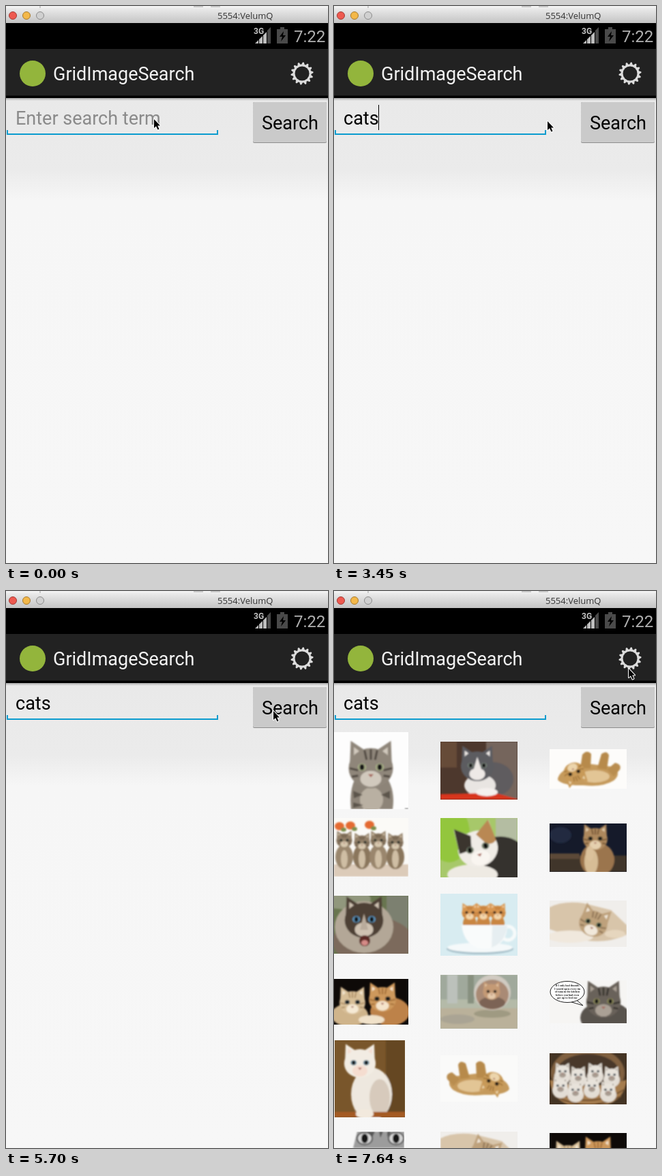
Write an HTML page that moves like this. It is 472x817 px and loops after 8 s.

```html
<!DOCTYPE html>
<html lang="en">
<head>
<meta charset="utf-8">
<title>Image search</title>
<style>
html, body { margin: 0; width: 100%; height: 100%; overflow: hidden; background: #f7f7f7; }
body > svg { display: block; width: 100%; height: 100%; }
text { font-family: Roboto, sans-serif; font-size: 27px; }
</style>
</head>
<body>
<svg viewBox="0 0 472 817">
  <defs>
    <linearGradient id="page" x2="0" y2="1">
      <stop offset="0" stop-color="#e9e9e9"/><stop offset=".155" stop-color="#ebebeb"/>
      <stop offset=".222" stop-color="#f6f6f6"/><stop offset="1" stop-color="#f7f7f7"/>
    </linearGradient>
    <linearGradient id="chrome" x2="0" y2="1">
      <stop offset="0" stop-color="#ebebeb"/><stop offset="1" stop-color="#c4c4c4"/>
    </linearGradient>
    <linearGradient id="shade" x2="0" y2="1">
      <stop offset="0" stop-color="#aaa"/><stop offset="1" stop-color="#e9e9e9"/>
    </linearGradient>
    <filter id="soft"><feGaussianBlur stdDeviation=".8"/></filter>
  </defs>

  <rect y="135" width="472" height="682" fill="url(#page)"/>
  <rect y="135" width="472" height="4" fill="url(#shade)"/>

  <!-- window title -->
  <rect width="472" height="3" fill="#f1f1f1"/>
  <path d="M275 0h14v2h-14zM300 0h14v2h-14zM49 0h2v3h-2z" fill="#c8c8c8"/>
  <rect y="3" width="472" height="22" fill="url(#chrome)"/>
  <g stroke-width="1">
    <circle cx="10" cy="14" r="5.5" fill="#ee5a50" stroke="#a33a35"/>
    <circle cx="30" cy="14" r="5.5" fill="#f3b84a" stroke="#a87a2c"/>
    <circle cx="50" cy="14" r="5.5" fill="#d0d0d0" stroke="#8c8c8c"/>
  </g>
  <text x="310" y="19" fill="#333" style="font:13px 'Open Sans',sans-serif">5554:VelumQ</text>

  <!-- status bar -->
  <rect y="25" width="472" height="38"/>
  <text x="363" y="41" fill="#c4c4c4" style="font-size:12px;font-weight:700">3G</text>
  <path d="M365 55L383 37V55z" fill="#bdbdbd"/>
  <path d="M383 36L388 31V55H383z" fill="#4a4a4a"/>
  <path d="M370.500 49V55M376.500 43V55M382.500 37V55" stroke="#000"/>
  <path d="M402 31h6v3h5v21h-16V34h5z" fill="#4a4a4a"/>
  <path d="M407 37l-6 8h4l-2 7 7-9h-4z"/>
  <text x="422" y="53" fill="#b0b0b0" style="font-size:24px">7:22</text>

  <!-- action bar -->
  <rect y="63" width="472" height="69" fill="#222"/>
  <rect y="131.500" width="472" height="3.500"/>
  <circle cx="39" cy="99" r="19" fill="#93b53c"/>
  <text x="69" y="109" fill="#f3f3f3">GridImageSearch</text>
  <path id="gear" fill="#dcdcdc"/>
  <circle cx="434" cy="99" r="10.500" fill="#222"/>

  <!-- search form -->
  <path d="M2 182V188H310V182" fill="none" stroke="#0a9bce" stroke-width="2"/>
  <text id="field" x="14" y="174"></text>
  <rect id="caret" y="145" width="1" height="37"/>
  <rect x="362" y="141" width="108" height="60" rx="2" fill="#8e8e8e"/>
  <rect id="button" x="362" y="141" width="108" height="59" rx="2"/>
  <text x="375" y="181">Search</text>

  <g id="results"></g>
  <path id="pointer" d="M0 0V13L3 10.200L5.500 15.500L7.500 14.500L5.200 9.500H9z" stroke="#fff" stroke-width="2" paint-order="stroke" stroke-linejoin="round"/>
</svg>
<script>
const $ = id => document.getElementById(id);

$('gear').setAttribute('d', 'M' + Array.from({ length: 56 }, (_, i) => {
  const r = i % 4 < 2 ? 16.5 : 13.5, a = (i + .5) * Math.PI / 28;
  return [434 + r * Math.sin(a), 99 - r * Math.cos(a)].map(n => n.toFixed(1));
}).join('L') + 'z');

// ---- simplified photos ----
const box = (x, y, w, h, c) => `<rect x="${x}" y="${y}" width="${w}" height="${h}" fill="${c}"/>`;
const oval = (x, y, rx, ry, c) => `<ellipse cx="${x}" cy="${y}" rx="${rx}" ry="${ry}" fill="${c}"/>`;
const poly = (d, c) => `<path d="${d}" fill="${c}"/>`;
const move = (t, s) => `<g transform="${t}">${s}</g>`;
const row = (xs, f) => xs.map(f).join('');
const frameOf = (x, y, w, h, s) => `<svg x="${x}" y="${y}" width="${w}" height="${h}">${s}</svg>`;
const tile = (x, y, w, h, bg, ...parts) =>
  frameOf(x, y, w, h, box(0, 0, w, h, bg) + `<g filter="url(#soft)">${parts.join('')}</g>`);

// cat head of radius r: fur, muzzle, eye and stripe colours
const head = (x, y, r, fur, light, eye = '#222', mark = '') => move(`translate(${x} ${y}) scale(${r / 10})`,
  poly('M-10 0L-9.500 -13L-2 -8H2L9.500 -13L10 0z', fur) +
  poly('M-8 -5L-8 -10L-4 -7zM8 -5L8 -10L4 -7z', light) +
  oval(0, 0, 10.5, 9.5, fur) +
  (mark && `<path d="M0 -9V-4M-3 -8.500L-2 -4M3 -8.500L2 -4M-10 0L-6 1M10 0L6 1M-9 4L-6 3.500M9 4L6 3.500" stroke="${mark}"/>`) +
  oval(0, 5, 5, 3.8, light) +
  oval(-4.2, -.5, 2, 1.8, eye) + oval(4.2, -.5, 2, 1.8, eye) +
  oval(-4.2, -.5, 1.1, 1.4, '#151515') + oval(4.2, -.5, 1.1, 1.4, '#151515') +
  poly('M-1.300 2.800H1.300L0 4.300z', '#a5655a'));

const rolling = poly('M20 32Q38 20 62 22L94 26Q106 36 94 46Q78 56 50 53Q20 54 12 45Q12 38 20 32z', '#c59a5c') +
  poly('M45 28L48 8Q55 0 61 7L60 28zM70 28L76 7Q84 1 87 9L84 30z', '#b78a4b') +
  poly('M84 30L96 20Q106 22 103 30L94 40z', '#b98d50') +
  oval(66, 40, 22, 9, '#e2c595') +
  move('rotate(160 36 34)', head(36, 34, 15, '#c89a58', '#ecd5ac', '#4c3a22', '#9a7039'));

const lounging = poly('M0 10Q20 0 50 4L90 14L113 36V50Q80 66 40 56L0 42z', '#d8c5aa') +
  oval(30, 53, 34, 9, '#f0e8dd') +
  move('rotate(20 64 34)', head(64, 34, 20, '#bea17c', '#f1e8da', '#65765b', '#8c7253')) +
  oval(96, 49, 15, 6, '#e6d6be');

const pair = oval(23, 53, 27, 17, '#cfb48b') + oval(82, 48, 29, 21, '#bd8248') +
  head(27, 35, 18, '#d8bf98', '#f5e9d4', '#30404a', '#aa8a60') +
  head(71, 30, 19, '#cd985c', '#f5e4cb', '#33302a', '#a06c36') +
  oval(55, 60, 19, 7, '#f0e1c9');

const bubble =
  `<path d="M37 27L49 37L29 31" fill="#fff" stroke="#222"/>
  <ellipse cx="26" cy="17" rx="25" ry="15.500" fill="#fff" stroke="#222"/>
  <g fill="#222" text-anchor="middle">` +
  row(['If I only had thumbs', 'I would open every tin', 'of tuna in the kitchen', 'before you had even', 'got up to feed me'],
    (s, i) => `<text x="26" y="${9 + i * 4.6}" style="font:700 4px 'Liberation Serif',serif">${s}</text>`) + '</g>';

$('results').innerHTML = [
  tile(0, 207, 109, 113, '#fdfdfd',
    poly('M25 113Q22 85 32 66H77Q90 85 86 113z', '#8d8478'),
    oval(55, 99, 17, 18, '#b9b0a2'),
    poly('M28 86L42 92L29 97zM82 86L69 92L82 98zM28 103L43 107L28 111z', '#5b544b'),
    head(54, 53, 31, '#8f867a', '#d1c9bd', '#a7ae86', '#514a42'), box(104, 112, 5, 1, '#333')),

  tile(156, 221, 113, 85, '#4d382d',
    box(67, 0, 46, 85, '#75655c'), box(0, 0, 24, 38, '#664b38'),
    oval(77, 55, 30, 25, '#5e5b5e'), oval(58, 64, 23, 16, '#e9e5e2'),
    poly('M0 77L79 75L113 84V85H0z', '#d8361c'), head(54, 36, 23, '#5c5c61', '#eee9e6', '#778178'),
    poly('M54 22L47 47H62z', '#eee9e6'), oval(68, 74, 16, 6, '#f4f0ed')),

  tile(316, 232, 113, 58, '#fdfcfa', rolling),

  tile(0, 333, 109, 86, '#fbfaf7',
    box(0, 68, 109, 18, '#dccbb9'),
    row([15, 41, 65, 90], (x, i) => oval(x, 57, 13, 18, i % 2 ? '#8a765c' : '#9a866d') + oval(x, 60, 5, 13, '#cfbea4') +
      head(x, 33 + i % 2 * 3, 11, '#927f68', '#d7c8af', '#3f493d', '#594a38')),
    row([8, 24, 52], (x, i) => oval(x, 12 - i, 7, 6, '#e46a30') + oval(x + 6, 17 - i, 4, 3, '#7b8e4b'))),

  tile(156, 333, 113, 87, '#a7c86a',
    oval(13, 23, 30, 42, '#93c63e'), box(81, 0, 32, 40, '#b4bda2'),
    oval(88, 64, 41, 37, '#34302d'), oval(47, 83, 37, 15, '#eeeae3'),
    move('rotate(-16 55 45)', head(55, 45, 28, '#f0ece6', '#f9f5f0', '#788271') +
      poly('M27 45L29 8L50 24L46 42Q36 46 27 45z', '#3a342f') + poly('M58 24L81 8L84 40Q76 46 68 40z', '#b98853') +
      row([43, 67], x => oval(x, 44, 5, 5, '#75816d') + oval(x, 44, 3, 4, '#111')))),

  tile(316, 341, 113, 71, '#151a2a',
    box(0, 47, 113, 24, '#40342a'), box(0, 44, 44, 8, '#5b4938'), oval(16, 17, 16, 12, '#202940'),
    oval(70, 53, 25, 25, '#9b754d'), oval(61, 56, 10, 19, '#d7bd96'),
    head(67, 23, 17, '#ad885d', '#e5d0af', '#3d3a2c', '#6d4d2e'), oval(59, 44, 6, 11, '#dbc19b')),

  tile(0, 447, 109, 85, '#68754f',
    box(77, 0, 32, 85, '#7b8070'), oval(16, 5, 38, 15, '#91977d'),
    oval(57, 67, 59, 36, '#7c6b5c'), oval(44, 46, 43, 38, '#b3a797'),
    head(44, 36, 27, '#4d4036', '#cfc2b2', '#5c9bc7'), poly('M44 26L38 50H50z', '#b9ab9c'),
    oval(45, 66, 8, 8, '#5c2926'), oval(45, 69, 5, 4, '#d58b87')),

  tile(156, 444, 113, 91, '#d8ecf1',
    oval(58, 81, 49, 8, '#a8c1cb'), oval(58, 79, 48, 7, '#f5f9fa'),
    `<circle cx="99" cy="58" r="10" fill="none" stroke="#f7fafa" stroke-width="5"/>`,
    row([43, 63, 84], x => oval(x, 45, 10, 14, '#c98643') + head(x, 28, 11, '#d99650', '#f3d7ac', '#443022', '#b26d2e')),
    poly('M31 46H98Q98 78 65 81Q35 79 31 46z', '#f9fbfb'), poly('M76 47H98Q95 72 75 79z', '#e6eef1')),

  tile(316, 454, 113, 68, '#f0eeeb', lounging),
  tile(0, 569, 109, 67, '#0e0a08', pair),

  tile(156, 563, 113, 79, '#b4baa8',
    box(0, 0, 113, 36, '#a0a99c'), box(10, 0, 15, 42, '#bcc1bb'), box(40, 0, 9, 42, '#87907f'),
    box(0, 49, 113, 30, '#bab19a'), oval(25, 65, 25, 7, '#aaa494'), oval(76, 57, 27, 6, '#9f9a82'),
    oval(76, 26, 27, 26, '#d0cac1'), oval(76, 29, 24, 22, '#a98a75'), oval(76, 41, 19, 9, '#7c6454'),
    head(75, 25, 12, '#c49a75', '#e4c9aa', '#4c4033')),

  tile(316, 571, 113, 63, '#f6f5f3',
    oval(82, 55, 37, 24, '#59534e'), head(79, 32, 24, '#69625a', '#aaa095', '#8d8b59', '#302d29')),
  frameOf(316, 571, 113, 63, bubble),

  tile(1, 659, 103, 113, '#79562b',
    box(75, 0, 28, 113, '#654622'), oval(54, 79, 30, 39, '#eee8df'), oval(66, 84, 15, 27, '#d7cabc'),
    head(37, 34, 22, '#f2ece3', '#f5ddd0', '#658da0'), box(0, 105, 103, 8, '#a45a20'), oval(44, 108, 13, 7, '#f2e9dd')),

  tile(156, 681, 113, 68, '#fafaf9', move('translate(113 5) scale(-1 1)', rolling)),

  tile(316, 678, 113, 75, '#443424',
    oval(56, 29, 54, 38, '#806040'), oval(56, 30, 47, 29, '#49392b'),
    poly('M0 39Q56 57 113 39Q109 69 84 75H27Q3 67 0 39z', '#a57c4d'),
    `<path d="M3 53Q56 85 110 53M8 63Q56 88 105 63" fill="none" stroke="#6e4d2d" stroke-width="2"/>`,
    row([19, 42, 67, 91, 16, 38, 62, 86], (x, i) => {
      const y = i < 4 ? 27 + i % 2 * 5 : 48 + i % 2 * 6;
      return oval(x, y + 7, 12, 11, '#e3ddd4') + head(x, y, 10, '#e8e3db', '#a79c91', '#596b79');
    })),

  tile(0, 793, 103, 24, '#f7f7f7',
    poly('M28 24L34 0H103V24z', '#9c9c9c'), poly('M49 0L55 10L60 0M66 0L68 9L72 0M78 0L78 8L84 0', '#555'),
    row([45, 91], x => oval(x, 10, 12, 10, '#4b4b4b') + oval(x, 10, 10, 8, '#d7d7d7') + oval(x, 10, 5, 7, '#151515'))),
  tile(156, 793, 113, 24, '#f0eeeb', lounging),
  tile(316, 795, 113, 22, '#0e0a08', pair)
].join('');

// ---- timeline ----
const LOOP = 8000;
const blinks = [150, 1200, 1500, 2700, 3150, 3600, 4050, 4650, 5100, 5700, 6150, 6600, 7190, 7640];
const typed = [[0, '', 14], [1500, 'c', 27], [1800, 'ca', 42], [2100, 'cat', 51], [3150, 'cats', 65]];
const trail = [
  [0, 217, 166], [3450, 313, 169], [3600, 351, 170], [3750, 375, 172], [3900, 392, 176],
  [6750, 396, 158], [6900, 404, 111], [7040, 408, 101], [7190, 423, 107], [7340, 432, 114]
];
const at = (steps, t) => steps.findLast(s => s[0] <= t);
const show = (id, on) => $(id).setAttribute('visibility', on ? 'visible' : 'hidden');

function draw(t) {
  const [, word, caretX] = at(typed, t), [, x, y] = at(trail, t);
  $('field').textContent = word || 'Enter search term';
  $('field').setAttribute('fill', word ? '#000' : '#8a8a8a');
  $('caret').setAttribute('x', caretX);
  show('caret', blinks.filter(b => b <= t).length % 2);
  $('button').setAttribute('fill', t >= 5100 && t < 5400 ? '#97d1e8' : '#cacaca');
  show('results', t >= 6150);
  $('pointer').setAttribute('transform', `translate(${x} ${y})`);
}

const start = performance.now();
function frame() {
  draw((performance.now() - start) % LOOP);
  requestAnimationFrame(frame);
}
frame();
</script>
</body>
</html>
```
